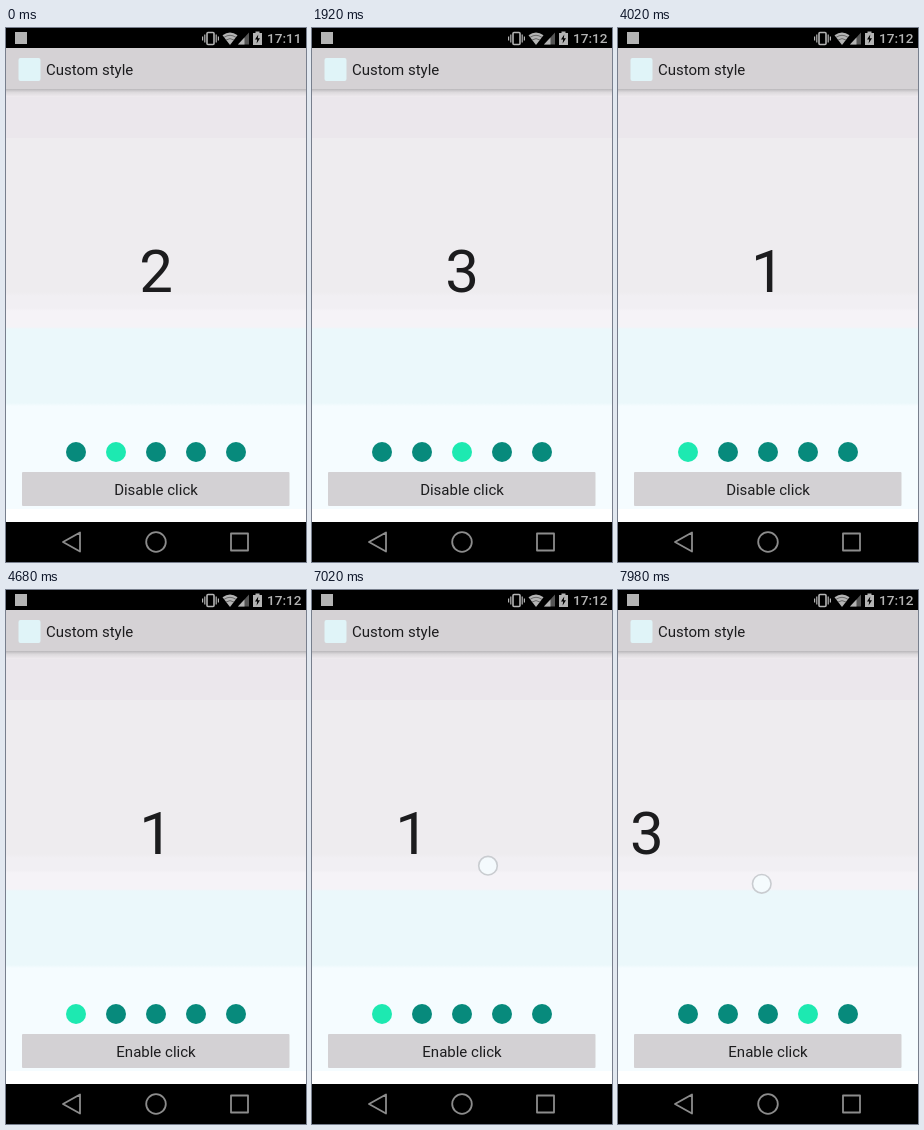
An HTML page that plays this animation: 300x534 px, repeating every 8000 ms.

```html
<!DOCTYPE html>
<html lang="en">
<head>
<meta charset="utf-8">
<title>Custom style</title>
<style>
  html, body { margin: 0; width: 100%; height: 100%; overflow: hidden; }
  svg {
    display: block; width: 300px; height: 534px; font-family: Roboto, sans-serif;
    background: linear-gradient(#ebe7ec 110px, #eeecef 110px 264px, #f1eff3 268px 280px, #f5f3f7 283px 299px,
      #ebf8fb 301px 375px, #f5fcff 378px 481px, #fff 481px);
  }
  text { fill: #1c1c1e; }
  .line { fill: none; stroke: #b4b4b4; }
  .nav { fill: none; stroke: #8c8c8c; stroke-width: 1.8; stroke-linejoin: round; }
</style>
</head>
<body>
<svg viewBox="0 0 300 534">
  <defs>
    <linearGradient id="shade" x2="0" y2="1">
      <stop stop-color="#b9b7ba"/>
      <stop offset=".4" stop-color="#dcd9dc"/>
      <stop offset="1" stop-color="#efebef"/>
    </linearGradient>
  </defs>

  <g id="pages" font-size="60" text-anchor="middle"></g>
  <g id="dots"></g>

  <rect id="button" x="16" y="444" width="267.5" height="34" rx="1"/>
  <text id="label" x="150" y="466.6" font-size="15" text-anchor="middle"></text>

  <!-- action bar -->
  <rect y="61" width="300" height="8" fill="url(#shade)"/>
  <rect y="20" width="300" height="41" fill="#d5d2d5"/>
  <rect x="12.5" y="30" width="22" height="23" rx="2" fill="#e0f4f8"/>
  <text x="40" y="46.5" font-size="15">Custom style</text>

  <!-- status bar -->
  <rect width="300" height="20"/>
  <rect x="9" y="4" width="12" height="12" fill="#b4b4b4"/>
  <rect class="line" x="201" y="4.5" width="7" height="12" rx="1" stroke-width="1.6"/>
  <path class="line" d="M198.8 6.5v8M196.6 8.5v4M210.2 6.5v8M212.4 8.5v4" stroke-width="1.2"/>
  <path d="M224 17 216.5 7.2Q224 1.8 231.5 7.2Z" fill="#b4b4b4"/>
  <path class="line" d="M218 9.4Q224 5.2 230 9.4M220 12Q224 9.2 228 12" style="stroke:#555" stroke-width=".8"/>
  <path d="M232 16.5 243 4.5V16.5Z" fill="#555"/>
  <path d="M232 16.5 238.5 9.4V16.5Z" fill="#b4b4b4"/>
  <path d="M247 5H249.5V3.5H253.5V5H256V17H247Z" fill="#b4b4b4"/>
  <path d="M252.3 6.5 249 11.5H251.2L250.6 15.5 254 10.3H251.8Z"/>
  <text id="clock" x="261" y="15.3" font-size="13.6" font-weight="500" style="fill:#b4b4b4"></text>

  <!-- navigation bar -->
  <rect y="494" width="300" height="40"/>
  <path class="nav" d="M57 514 74 504.5V523.5Z"/>
  <circle class="nav" cx="150" cy="514" r="9.8"/>
  <rect class="nav" x="225" y="505.5" width="17" height="17"/>

  <circle id="touch" r="9.3" fill="#f5fcfe" fill-opacity=".85" stroke="#c9ccd0" stroke-width="1.6"/>
</svg>
<script>
const LOOP = 8000, STEP = 60, WIDTH = 300;
const DOT_X = 70, DOT_GAP = 40, DOT_Y = 424, BUTTON_Y = 444;
const TAP = 120, SWIPE = 135, FADE = 120;  // ms
const SPEED = .95, SLOP = 7;               // finger px per ms, px before the page follows

// finger down: time, x, y
const gestures = [
  [1560, 154, 429], [2520, 192, 428], [3540, 74, 427],
  [4440, 182, 461],
  [5220, 156, 429], [5760, 192, 427], [6420, 117, 428],
  [6960, 233, 270], [7440, 233, 270], [7845, 272, 281]
];

const $ = id => document.getElementById(id);
const clamp = k => Math.max(0, Math.min(1, k));
const easeOut = k => 1 - (1 - clamp(k)) ** 5;

// replay every gesture begun so far
function stateAt(t) {
  const state = { page: 1, position: 1, clickable: true, pressed: false, touch: { x: 0, y: 0, opacity: 0 } };
  for (const [start, x, y] of gestures) {
    const age = t - start;
    if (age < 0) break;
    const swipe = y < DOT_Y - DOT_GAP;
    const hold = swipe ? SWIPE : TAP;
    const released = age >= hold;
    const travel = swipe ? SPEED * Math.min(age, hold) : 0;
    state.touch = { x: x - travel, y: y + travel / 10, opacity: clamp(1 - (age - hold) / FADE) };

    if (y > BUTTON_Y) {
      state.pressed = age < hold + STEP;
      state.clickable = !released;
      continue;
    }
    const { page, clickable } = state;
    const dragged = page + Math.max(0, travel - SLOP) / WIDTH;
    state.position = dragged;
    if (released) {
      const dot = Math.round((x - DOT_X) / DOT_GAP);
      state.page = swipe ? page + 1 : clickable ? dot : page;
      const duration = 100 * (Math.abs(state.page - page) + 1);
      state.position += (state.page - dragged) * easeOut((age - hold) / duration);
    }
  }
  return state;
}

for (let i = 0; i < 5; i++) {
  $('pages').innerHTML += `<text x="${WIDTH * (i + .5)}" y="263.6">${i + 1}</text>`;
  $('dots').innerHTML += `<circle cx="${DOT_X + DOT_GAP * i}" cy="${DOT_Y}" r="10"/>`;
}
const dots = [...$('dots').children];

function draw(t) {
  const { page, position, clickable, pressed, touch } = stateAt(t);
  $('clock').textContent = t < 120 ? '17:11' : '17:12';
  $('pages').setAttribute('transform', `translate(${-WIDTH * position})`);
  dots.forEach((dot, i) => dot.setAttribute('fill', i === page ? '#1de9b1' : '#078a7c'));
  $('button').setAttribute('fill', pressed ? '#bebcbf' : '#d3d1d4');
  $('label').textContent = clickable ? 'Disable click' : 'Enable click';
  $('touch').setAttribute('cx', touch.x);
  $('touch').setAttribute('cy', touch.y);
  $('touch').setAttribute('opacity', touch.opacity);
}

// the screen advances in fixed steps
function tick() {
  draw(Math.floor(performance.now() % LOOP / STEP) * STEP);
  requestAnimationFrame(tick);
}
tick();
</script>
</body>
</html>
```
